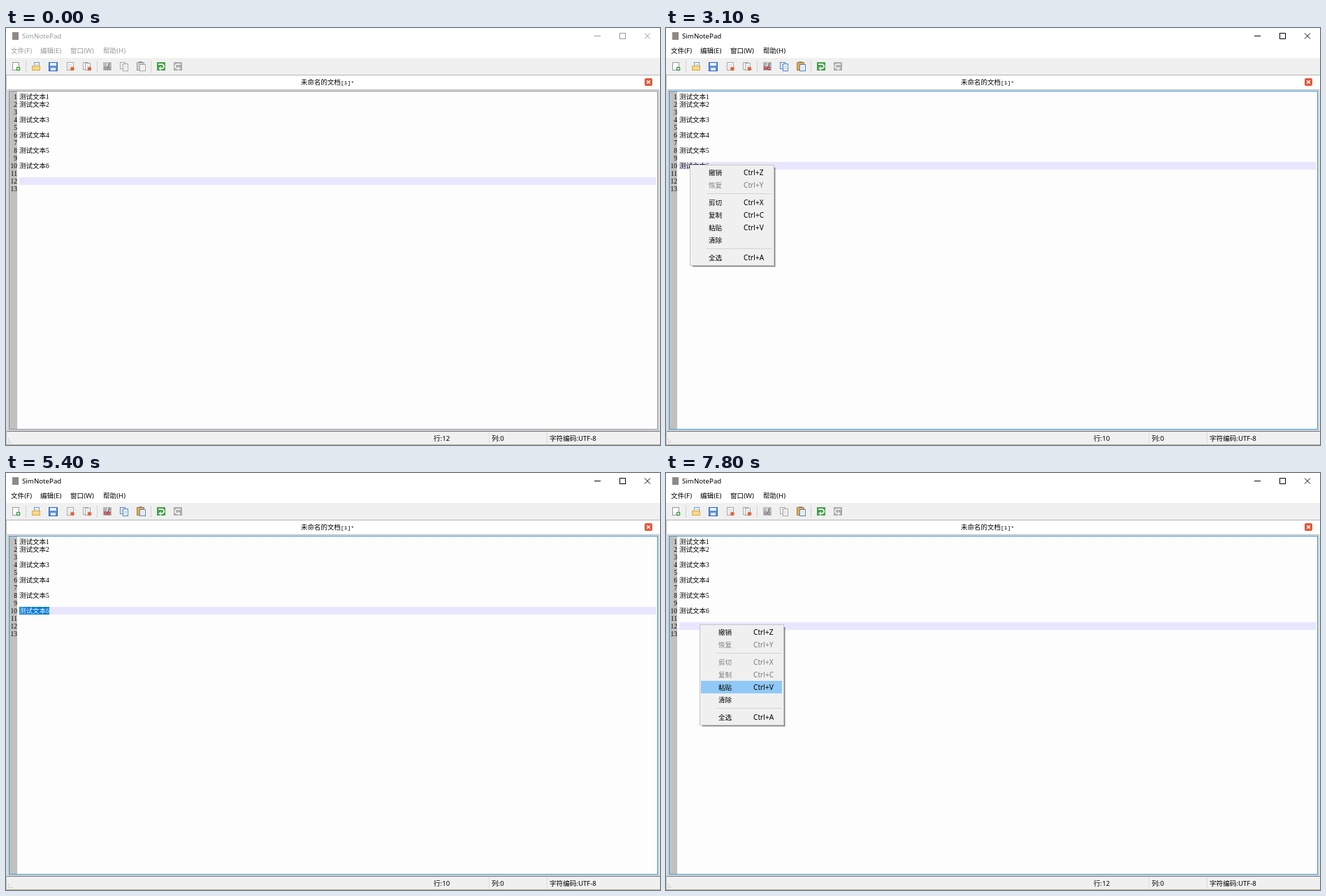
An HTML page with a canvas that plays this animation: 936 by 598 pixels, repeating every 8000 ms.

```html
<!DOCTYPE html>
<html lang="zh-CN">
<head>
<meta charset="utf-8">
<title>SimNotePad</title>
<style>
html, body { margin: 0; width: 100%; height: 100%; overflow: hidden; background: #fff; }
canvas { display: block; }
</style>
</head>
<body>
<canvas id="stage" width="936" height="598"></canvas>
<script>
const g = document.getElementById('stage').getContext('2d');
const LOOP = 8000, ROW = 11, TEXT_X = 19, TEXT_Y = 93;
const UI = '"Noto Sans", "Noto Sans CJK SC", "Noto Sans CJK", sans-serif';
const CODE = '"Liberation Serif", "Noto Sans CJK SC", "Noto Sans CJK", serif';
const LINES = { 1: '测试文本1', 2: '测试文本2', 4: '测试文本3', 6: '测试文本4', 8: '测试文本5', 10: '测试文本6' };
const CARET_ON = [[1400, 1900], [2400, 2800], [4900, 5400], [5900, 6500]];
const MENU = [
  ['撤销', 'Ctrl+Z', 2], ['恢复', 'Ctrl+Y', 20], ['剪切', 'Ctrl+X', 45], ['复制', 'Ctrl+C', 63],
  ['粘贴', 'Ctrl+V', 81], ['清除', '', 99], ['全选', 'Ctrl+A', 124]
];

function box(x, y, w, h, color) {
  g.fillStyle = color;
  g.fillRect(x, y, w, h);
}

function frame(x, y, w, h, color, fill) {
  if (fill) box(x, y, w, h, fill);
  g.strokeStyle = color;
  g.lineWidth = 1;
  g.strokeRect(x + .5, y + .5, w - 1, h - 1);
}

function line(points, color, width = 1) {
  g.strokeStyle = color;
  g.lineWidth = width;
  g.beginPath();
  points.forEach(([x, y]) => g.lineTo(x, y));
  g.stroke();
}

function dot(x, y, r, color) {
  g.fillStyle = color;
  g.beginPath();
  g.arc(x, y, r, 0, 7);
  g.fill();
}

function ring(x, y, r, color) {
  g.strokeStyle = color;
  g.lineWidth = 1.3;
  g.beginPath();
  g.arc(x, y, r, 0, 7);
  g.stroke();
}

function text(s, x, y, color = '#000', size = 9.6, family = UI, align = 'left') {
  g.font = `${size}px ${family}`;
  g.textAlign = align;
  g.fillStyle = color;
  g.fillText(s, x, y);
}

function cross(x, y, r, color, width) {
  line([[x - r, y - r], [x + r, y + r]], color, width);
  line([[x - r, y + r], [x + r, y - r]], color, width);
}

function page(x, y, w, h, edge, ink) {
  frame(x, y, w, h, edge, '#fcfcfc');
  if (ink) for (let i = 3; i < h - 2; i += 2) box(x + 2, y + i, w - 4, 1, ink);
}

function drawTitle(active) {
  const ink = active ? '#000' : '#999';
  box(0, 0, 936, 43, '#fff');
  box(9, 6, 9, 11, '#8d8a86');
  text('SimNotePad', 23, 15, ink, 9.7);
  line([[842, 11.5], [851, 11.5]], ink);
  frame(878, 7, 9, 9, ink);
  cross(918, 11.5, 4, ink, 1);
  [['文件(F)', 7], ['编辑(E)', 49], ['窗口(W)', 92], ['帮助(H)', 139]]
    .forEach(([label, x]) => text(label, x, 36, ink));
}

function drawBackArrow(x, color, direction) {
  box(x - 6, 49, 12, 12, color);
  g.save();
  g.translate(x, 55);
  g.scale(direction, 1);
  line([[-4, -3], [2, -3], [4, -1], [4, 1], [2, 3], [-2, 3]], '#e6eee4', 2);
  line([[0, .5], [-3, 3], [0, 5.5]], '#e6eee4', 1.3);
  g.restore();
}

function drawToolbar(canCopy, canPaste) {
  box(0, 43, 936, 25, '#f0f0f1');
  box(0, 43, 936, 1, '#f1f0e4');
  box(0, 67, 936, 1, '#b4b4b4');
  [28, 130, 207].forEach(x => box(x, 47, 1, 17, '#d2d2d2'));

  page(9, 49, 10, 12, '#9a9a9a');
  dot(17.5, 58.5, 3, '#3d9b3d');
  box(15.5, 58, 4, 1, '#fff');
  box(17, 56.5, 1, 4, '#fff');

  page(40, 49, 8, 7, '#6d9bd1', '#a9c9ec');
  box(37, 54, 12, 7, '#e2a53a');
  box(38, 55, 10, 5, '#f9d98a');

  frame(61, 49, 13, 13, '#2d62b5', '#5b91dc');
  box(63, 50, 9, 4, '#eaf2fc');
  box(64, 57, 7, 4, '#dce8f6');

  page(87, 49, 10, 12, '#a5a5a5', '#d5d5d5');
  dot(95, 58.5, 2.8, '#e2663a');
  page(110, 49, 8, 11, '#a5a5a5');
  page(113, 50, 8, 11, '#a5a5a5', '#d5d5d5');
  dot(119.5, 58.5, 2.8, '#e2663a');

  box(139, 49, 12, 12, canCopy ? '#b0b2b5' : '#bdbdbd');
  line([[146, 50], [143, 57]], '#ededed', 1.3);
  line([[148, 50], [146, 57]], '#777', 1.3);
  const handles = canCopy ? '#c52d31' : '#858585';
  ring(142.5, 57.5, 1.8, handles);
  ring(147, 58, 1.8, handles);

  const edge = canCopy ? '#4d83c4' : '#a4a4a4';
  const ink = canCopy ? '#a9cbed' : '#dadada';
  page(163, 49, 8, 10, edge, ink);
  page(167, 51, 8, 11, edge, ink);

  frame(187, 49, 11, 12, canPaste ? '#b77d25' : '#9c9c9c', canPaste ? '#dfaa51' : '#cecece');
  box(190, 48, 5, 2, '#888');
  page(191, 52, 9, 10, canPaste ? '#4d83c4' : '#a4a4a4', canPaste ? '#c3daf2' : '#e0e0e0');

  drawBackArrow(222, '#42a047', 1);
  drawBackArrow(246, '#ababab', -1);
}

function drawTab() {
  box(0, 68, 936, 20, '#fff');
  text('未命名的文档', 422, 81, '#000', 9.5, CODE);
  text('[1]*', 479, 81, '#000', 8, '"Liberation Mono", monospace');
  g.fillStyle = '#e2583b';
  g.beginPath();
  g.roundRect(914, 72, 11, 11, 2);
  g.fill();
  cross(919.5, 77.5, 2.3, '#fff', 1.5);
}

function drawLine(n, color) {
  text(LINES[n], TEXT_X, TEXT_Y + ROW * n - 2.2, color, 9.5, CODE);
}

function drawEditor(active, row, selectFrom, caretX) {
  frame(2, 88, 933, 490, '#b5b5b5', '#f0f0f0');
  frame(4, 90, 929, 486, active ? '#2e8fd0' : '#82868c', '#fdfdfd');
  box(5, 91, 11, 484, '#c0c0c0');
  const top = TEXT_Y + ROW * (row - 1);
  box(TEXT_X, top, 911, ROW, '#e8e6ff');
  for (let n = 1; n <= 13; n++) {
    text(n, 16, TEXT_Y + ROW * n - 2.2, '#000', 9.5, CODE, 'right');
    if (LINES[n]) drawLine(n, '#000');
  }
  if (selectFrom !== null) {
    g.save();
    g.beginPath();
    g.rect(selectFrom, top, 62 - selectFrom, ROW);
    g.clip();
    box(selectFrom, top, 62 - selectFrom, ROW, '#0078d7');
    drawLine(row, '#fff');
    g.restore();
  }
  if (caretX !== null) {
    g.globalCompositeOperation = 'difference';
    box(caretX, top, 1, 10, '#fff');
    g.globalCompositeOperation = 'source-over';
  }
}

function drawStatus(row, col) {
  box(0, 578, 936, 1, '#858a90');
  box(0, 579, 936, 18, '#f0f0f0');
  box(691, 580, 1, 16, '#dcdcdc');
  box(774, 580, 1, 16, '#dcdcdc');
  text('行:' + row, 612, 592);
  text('列:' + col, 695, 592);
  text('字符编码:UTF-8', 778, 592);
  for (let i = 0; i < 3; i++)
    for (let j = 0; j <= i; j++) box(3 + 2.5 * j, 589 + 2.5 * i, 1, 1, '#aaa');
  box(0, 597, 936, 1, '#b8ad8b');
  box(0, 68, 1, 530, '#c4beb0');
}

function drawMenu(x, y, hover, disabled, alpha) {
  g.globalAlpha = alpha;
  box(x + 4, y + 4, 119, 143, 'rgba(0,0,0,.2)');
  box(x + 4, y + 4, 118, 142, 'rgba(0,0,0,.35)');
  frame(x, y, 121, 145, '#c6c6c6', '#f0f0f0');
  box(x + 24, y + 41, 94, 1, '#d4d4d4');
  box(x + 24, y + 120, 94, 1, '#d4d4d4');
  MENU.forEach(([label, keys, top], i) => {
    if (i === hover) box(x + 2, y + top, 116, 18, '#90c8f6');
    const ink = disabled.includes(i) ? '#7d7d7d' : '#000';
    text(label, x + 27, y + top + 12.6, ink);
    text(keys, x + 77, y + top + 12.6, ink, 10.2);
  });
  g.globalAlpha = 1;
}

function render(t) {
  const within = (a, b) => t >= a && t < b;
  const active = t >= 1400;
  const row = within(1400, 5600) ? 10 : 12;
  const col = within(1400, 2100) ? 5 : within(2100, 2200) ? 2 : 0;
  const selected = within(2100, 5600);
  const firstMenu = within(3000, 4900);
  const columnX = col === 5 ? 62 : TEXT_X + Math.round(col * 9.5);
  const caret = CARET_ON.some(([a, b]) => within(a, b));

  drawTitle(active);
  drawToolbar(selected, active);
  drawTab();
  drawEditor(active, row, selected && !firstMenu ? columnX : null, caret ? columnX : null);
  drawStatus(row, col);
  if (firstMenu) {
    const hover = within(4000, 4200) ? 0 : within(4300, 4500) ? 2 : t >= 4500 ? 3 : -1;
    drawMenu(34, 196, hover, [1], t < 3100 ? .5 : 1);
  }
  if (t >= 6800) drawMenu(48, 217, t >= 7800 ? 4 : -1, [1, 2, 3], t < 6900 ? .5 : 1);
}

function tick() {
  render(performance.now() % LOOP);
  requestAnimationFrame(tick);
}
tick();
</script>
</body>
</html>
```
